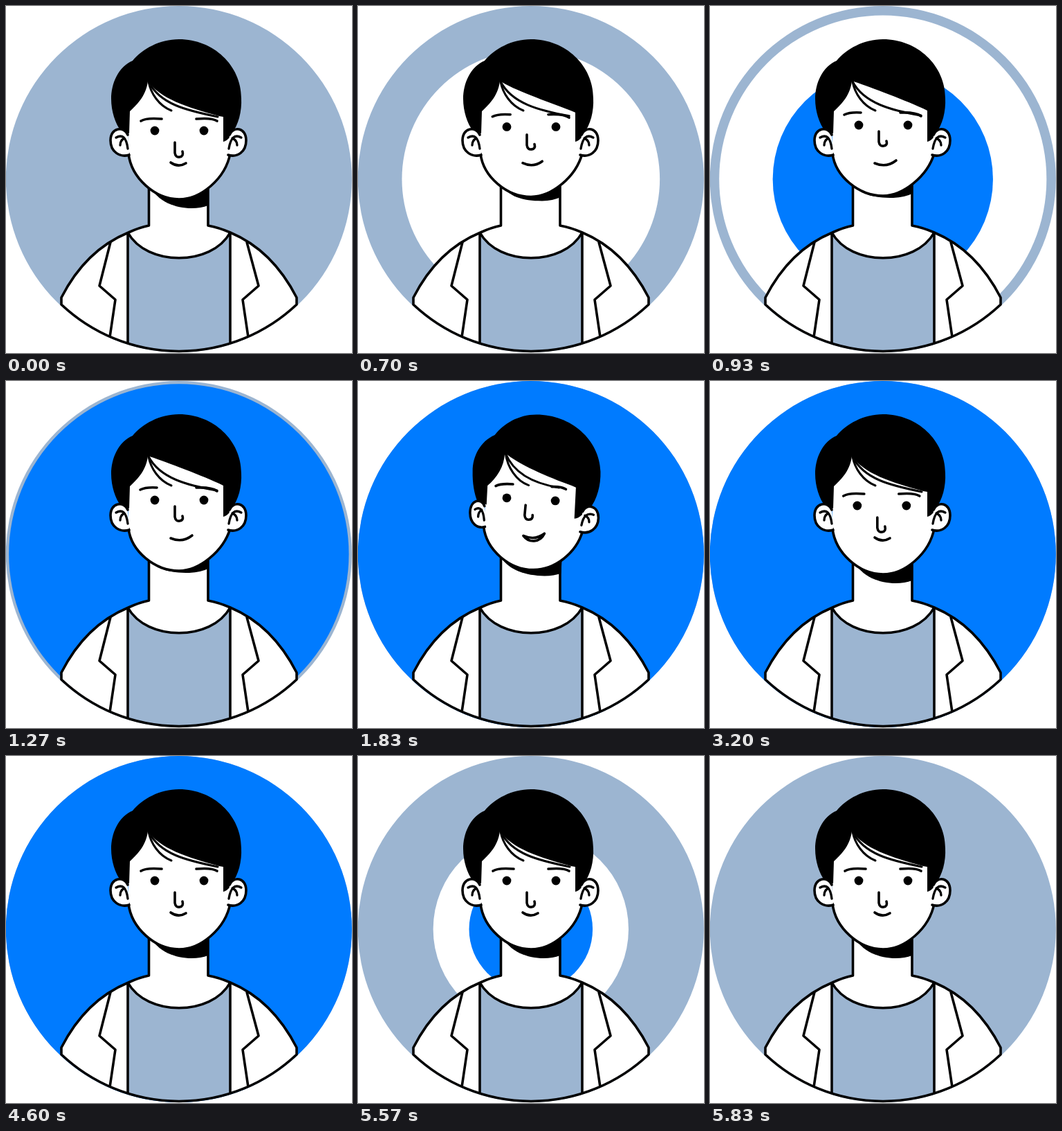
Write an HTML page with a canvas that moves like this. It is 500x501 px and loops after 6030 ms.

```html
<!DOCTYPE html>
<html lang="en">
<head>
<meta charset="utf-8">
<title>Portrait</title>
<style>
  html, body { margin: 0; width: 100%; height: 100%; overflow: hidden; background: #fff; }
  canvas { display: block; width: 500px; height: 501px; }
</style>
</head>
<body>
<canvas id="stage" width="500" height="501"></canvas>
<script>
const ctx = document.getElementById('stage').getContext('2d');
const LOOP = 6030;
const PALE = '#9cb5d1', BLUE = '#007bff', INK = '#000', WHITE = '#fff';
const LINE = 3.6;

// Each part has three poses: facing, chin up, turned. A missing pose repeats the first.
const parts = {
  shadow: [
    'M207 258 C218 283 246 292 268 292 Q282 292 292 288 L292 250 Z',
    'M207 256 C215 272 235 277 265 277 Q282 276 292 271 L292 250 Z',
    'M207 254 C222 274 250 286 275 287 Q285 288 295 286 L299 250 Z'],
  face: [
    'M176 105 L177 213 C181 248 215 279 250 279 C282 279 317 249 324 213 L326 105 Z',
    'M176 105 L177 213 C181 246 215 274 250 274 C279 274 314 246 324 213 L326 105 Z',
    'M205 98 L187 207 C191 241 222 271 258 271 C290 271 317 252 325 222 L335 100 Z'],
  jaw: [
    'M177 213 C181 248 215 279 250 279 C282 279 317 249 324 213',
    'M177 213 C181 246 215 274 250 274 C279 274 314 246 324 213',
    'M187 207 C191 241 222 271 258 271 C290 271 317 252 325 222'],
  hair: [
    'M178 184 L179 152 C191 141 203 128 205 108 C222 134 262 146 308 159 L314 160 L314 196 C320 194 324 190 326 184 C336 172 341 152 340 133 C340 86 300 48 250 48 C222 48 197 62 183 79 C162 88 152 112 152 134 C152 152 158 170 166 180 Z',
    'M178 184 L179 152 C191 141 203 128 205 108 C225 115 275 133 308 148 L314 151 L314 196 C320 194 324 190 326 184 C336 172 341 152 340 133 C340 86 300 48 250 48 C222 48 197 62 183 79 C162 88 152 112 152 134 C152 152 158 170 166 180 Z',
    'M195 172 L197 150 C212 138 221 120 221 98 C236 125 275 146 311 155 L316 157 L311 202 C322 204 328 190 346 184 C357 170 363 148 363 128 C360 84 318 49 267 49 C243 49 225 62 215 77 C195 86 182 104 182 126 C181 142 180 155 181 168 Z'],
  lock: [
    'M206 109 C209 126 221 144 239 151', ,
    'M222 99 C224 122 238 145 256 150'],
  fringe: [
    'M206 109 C222 142 262 151 306 160',
    'M206 109 C222 140 262 151 305 158',
    'M222 99 C229 126 248 145 273 149'],
  earL: [
    'M176 186 C171 173 151 175 151 194 C151 211 165 219 178 215', ,
    'M191 174 C187 162 175 167 175 186 C175 200 182 207 190 205'],
  foldL: [
    'M159 190 Q173 182 176 206 M165 201 Q165 194 171 191', ,
    'M181 180 Q189 174 190 195 M184 190 Q184 184 188 180'],
  earR: [
    'M323 186 C328 173 347 175 347 194 C347 211 334 219 321 215', ,
    'M326 192 C332 180 348 185 348 202 C347 217 334 225 321 221'],
  foldR: [
    'M340 190 Q326 182 322 206 M334 201 Q334 194 327 191', ,
    'M341 197 Q328 195 324 211 M334 207 Q335 201 329 198'],
  browL: [
    'M195 166 Q203 161 225 163',
    'M194 157 Q202 153 218 154',
    'M205 145 Q213 141 231 143'],
  browR: [
    'M275 163 Q297 161 305 166',
    'M275 154 Q297 153 305 159',
    'M286 151 Q290 151 295 153'],
  nose: [
    'M244 197 L244 212 Q245 219 251 218 Q257 217 255 210',
    'M244 181 L244 196 Q245 203 251 202 Q257 201 255 195',
    'M240 177 L237 191 Q237 198 242 198 Q248 199 249 192'],
  mouth: [
    'M238 226 Q249 233.5 260 227 C253 231.3 245 231 238 226 Z',
    'M238 227 Q255 234 269 223 C259.7 230.3 249.3 231.7 238 227 Z',
    'M240 219 Q256 227 270 217 C267 238 244 237 240 219 Z']
};
const eyes = [[215, 180, 286, 180], [215, 172, 286, 172], [215, 165, 284, 174]];

const BODY = new Path2D('M206.5 240 L206.5 317 Q192 320 177 327 C133 345 102 378 80 421 L80 431 A248 248 0 0 0 420 431 L420 421 C398 378 367 345 324 327 Q308 320 292 317 L292 240');
const SHIRT = new Path2D('M176 327 C203 376 297 376 324 327 L324 510 L176 510 Z');
const LAPELS = new Path2D('M151 341 L135 404 L158 424 L150 478 M348 341 L365 404 L342 424 L350 478');

const ramp = (t, a, b) => Math.min(1, Math.max(0, (t - a) / (b - a)));
const inOut = k => k < .5 ? 4 * k ** 3 : 1 - 4 * (1 - k) ** 3;
const outQuart = k => 1 - (1 - k) ** 4;
const lerp = (a, b, k) => a + (b - a) * k;

function mixPath(a, b, k) {
  const nums = b.match(/[\d.]+/g);
  let i = 0;
  return a.replace(/[\d.]+/g, n => lerp(+n, +nums[i++], k).toFixed(2));
}

function poseAt(t) {
  if (t < 1300) return [0, 1, inOut(ramp(t, 430, 900))];
  if (t < 2900) return [1, 2, inOut(ramp(t, 1550, 2130))];
  return [2, 0, inOut(ramp(t, 2900, 3200))];
}

function disc(r, color) {
  if (r <= 0) return;
  ctx.fillStyle = color;
  ctx.beginPath();
  ctx.arc(249.8, 250, r, 0, Math.PI * 2);
  ctx.fill();
}

function paint(path, fill, width) {
  if (fill) { ctx.fillStyle = fill; ctx.fill(path); }
  if (width) { ctx.lineWidth = width; ctx.stroke(path); }
}

// A white ripple stops short of the rim; a blue one follows and covers everything.
function background(t) {
  disc(250, PALE);
  const white = outQuart(ramp(t, 460, 1250)) * (1 - inOut(ramp(t, 5340, 5830)));
  const blue = outQuart(ramp(t, 747, 1570)) * (1 - inOut(ramp(t, 5300, 5790)));
  disc(243 * white, WHITE);
  disc(250 * blue, BLUE);
}

function torso() {
  ctx.fillStyle = WHITE;
  ctx.fill(BODY);
  ctx.save();
  ctx.clip(BODY);
  paint(SHIRT, PALE, LINE);
  paint(LAPELS, null, LINE);
  ctx.restore();
  paint(BODY, null, LINE);
}

function head(t) {
  const [from, to, k] = poseAt(t);
  const draw = (name, fill, width) => {
    const p = parts[name];
    paint(new Path2D(mixPath(p[from] || p[0], p[to] || p[0], k)), fill, width);
  };

  draw('shadow', INK);
  draw('face', WHITE);
  draw('jaw', null, LINE);
  draw('hair', INK);
  draw('fringe', null, 3);
  draw('lock', null, 3);
  for (const side of ['L', 'R']) {
    draw('ear' + side, WHITE, LINE);
    draw('fold' + side, null, 3.3);
  }
  draw('mouth', WHITE, LINE);

  // The features drift a little past centre as the head comes back.
  const drift = -2.2 * inOut(ramp(t, 2900, 3150)) * (1 - inOut(ramp(t, 3180, 3400)));
  ctx.save();
  ctx.translate(drift, 0);
  draw('browL', null, LINE);
  draw('browR', null, LINE);
  draw('nose', null, LINE);
  const blink = Math.sin(Math.PI * ramp(t, 3550, 3900)) + Math.sin(Math.PI * ramp(t, 4250, 4600));
  const [lx, ly, rx, ry] = eyes[from].map((v, i) => lerp(v, eyes[to][i], k));
  ctx.fillStyle = INK;
  for (const [x, y] of [[lx, ly], [rx, ry]]) {
    ctx.beginPath();
    ctx.ellipse(x, y, 6.4, 6.4 * (1 - .88 * blink), 0, 0, Math.PI * 2);
    ctx.fill();
  }
  ctx.restore();
}

function render(t) {
  ctx.fillStyle = WHITE;
  ctx.fillRect(0, 0, 500, 501);
  ctx.strokeStyle = INK;
  ctx.lineCap = ctx.lineJoin = 'round';
  background(t);
  torso();
  head(t);
}

const start = performance.now();
function tick() {
  render((performance.now() - start) % LOOP);
  requestAnimationFrame(tick);
}
tick();
</script>
</body>
</html>
```
